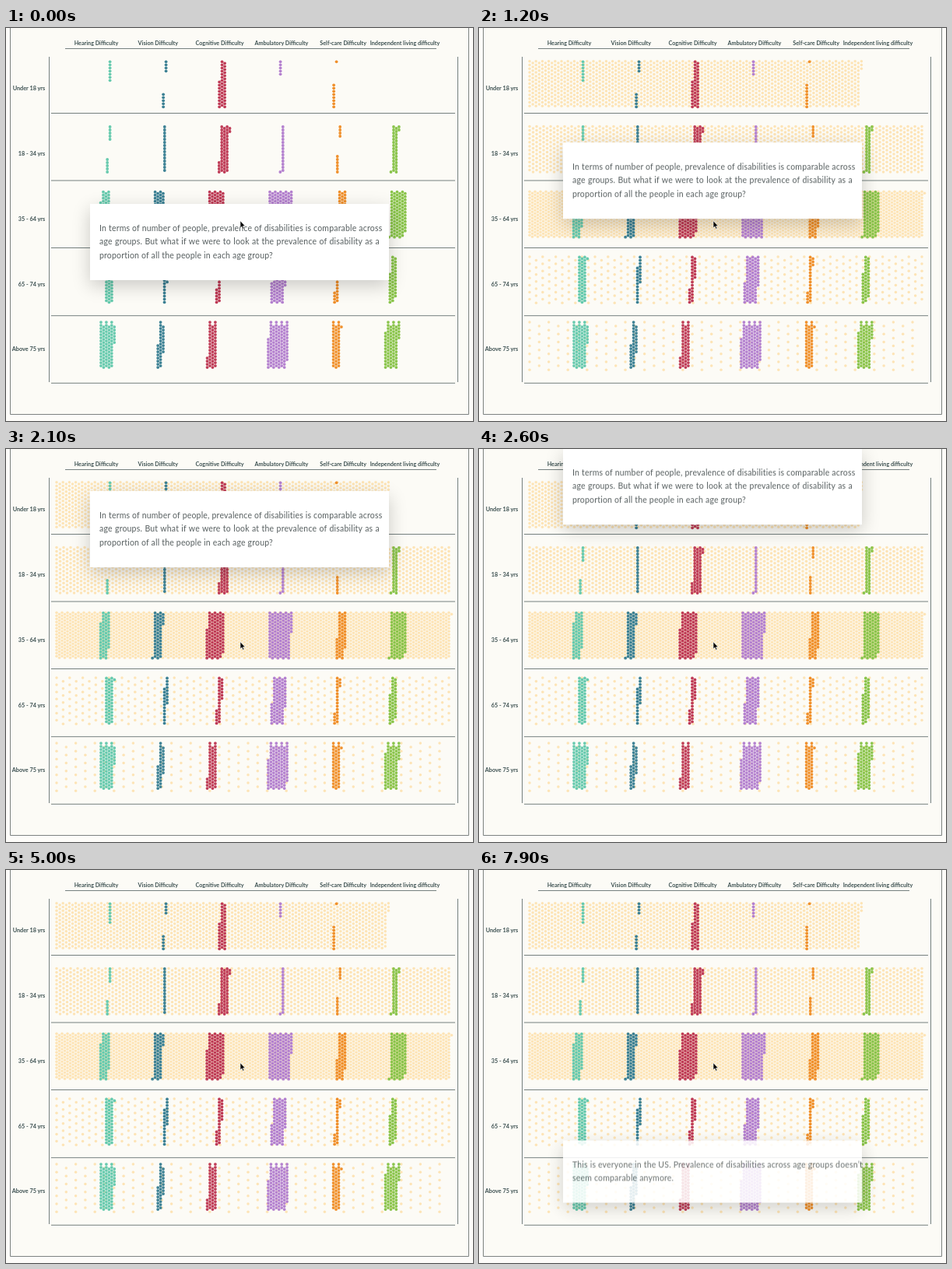
Animation of 600x505 px, one loop 8 s. Source, as an HTML page with a canvas:

```html
<!DOCTYPE html>
<html lang="en">
<head>
<meta charset="utf-8">
<title>Disability by age group</title>
<style>
  html, body { margin: 0; width: 100%; height: 100%; overflow: hidden; background: #fdfcf9; }
  #stage { position: relative; width: 600px; height: 505px; overflow: hidden; font-family: Lato, "Open Sans", sans-serif; }
  #stage > * { position: absolute; left: 0; top: 0; }
  svg text { font-size: 7.2px; font-weight: 700; fill: #3c5051; }
  svg .row { font-size: 7.3px; text-anchor: end; }
  svg .head { text-anchor: middle; }

  #everyone { animation: reveal 8s linear infinite; }
  .card {
    box-sizing: border-box; width: 384px; padding: 22.5px 12px;
    background: #fff; box-shadow: 0 7px 22px rgba(0, 0, 0, .2);
    color: #565e5f; font-size: 10.5px; line-height: 17.5px; letter-spacing: .19px;
  }
  .card span { display: block; white-space: nowrap; text-align: justify; text-align-last: justify; }
  .card span:last-child { text-align-last: left; }
  #question { animation: leave 8s linear infinite; }
  #answer { animation: enter 8s linear infinite; }

  @keyframes reveal {
    0%, 1% { opacity: 0; }
    7.5%, 100% { opacity: 1; }
  }
  @keyframes leave {
    0% { transform: translate(108px, 226px); animation-timing-function: cubic-bezier(.333, 0, .667, .333); }
    8.75% { transform: translate(108px, 196.5px); }
    21.25% { transform: translate(108px, 98px); }
    32.5% { transform: translate(108px, -.7px); }
    45.5%, 100% { transform: translate(108px, -140px); }
  }
  @keyframes enter {
    0%, 90.5% { transform: translate(108px, 386px); opacity: 0; }
    98.75%, 100% { transform: translate(108px, 347.5px); opacity: .87; }
  }
</style>
</head>
<body>
<div id="stage">
  <svg id="frame" width="600" height="505">
    <path d="M5.5 -2V496.5H594.5V-2" fill="#fcfbf6" stroke="#7d8281"/>
    <g id="axes" fill="none" stroke="#75807f"></g>
    <g id="labels"></g>
  </svg>
  <canvas id="everyone" width="600" height="505"></canvas>
  <canvas id="disabled" width="600" height="505"></canvas>
  <div class="card" id="question">
    <span>In terms of number of people, prevalence of disabilities is comparable across</span>
    <span>age groups. But what if we were to look at the prevalence of disability as a</span>
    <span>proportion of all the people in each age group?</span>
  </div>
  <div class="card" id="answer">
    <span>This is everyone in the US. Prevalence of disabilities across age groups doesn’t</span>
    <span>seem comparable anymore.</span>
  </div>
  <svg width="600" height="505">
    <path d="M301 247.8V256.8L303 255L304.4 258.2L305.9 257.5L304.5 254.5H307.2Z" fill="#000" stroke="#fff" stroke-width=".6"/>
  </svg>
</div>
<script>
const SVG = "http://www.w3.org/2000/svg";
const byId = id => document.getElementById(id);

function addTo(parent, tag, attrs, text = "") {
  const el = document.createElementNS(SVG, tag);
  for (const key in attrs) el.setAttribute(key, attrs[key]);
  el.textContent = text;
  byId(parent).append(el);
}

const kinds = ["Hearing Difficulty", "Vision Difficulty", "Cognitive Difficulty",
  "Ambulatory Difficulty", "Self-care Difficulty", "Independent living difficulty"];
const ages = ["Under 18 yrs", "18 - 34 yrs", "35 - 64 yrs", "65 - 74 yrs", "Above 75 yrs"];
const colors = ["#67caae", "#3c8194", "#bf3c57", "#b481cf", "#f0902c", "#8ac44b"];

const rowGap = 83.7;
kinds.forEach((name, i) => addTo("labels", "text", { class: "head", x: 116 + 79.3 * i, y: 22 }, name));
ages.forEach((name, i) => addTo("labels", "text", { class: "row", x: 50.3, y: 80.4 + rowGap * i }, name));

addTo("axes", "path", { d: "M76 26.5H553M55.5 37V455M580.5 37V455" });
[109.5, 196, 282.5, 369.7, 456.3].forEach(y => addTo("axes", "path", { d: `M58 ${y}H577` }));

function dot(ctx, x, y, r) {
  ctx.beginPath();
  ctx.arc(x, y, r, 0, 2 * Math.PI);
  ctx.fill();
}

// Everyone: staggered lattice per age group, with a short closing column
const fields = [
  { top: 42.7, bottom: 102.5, right: 490, dx: 4.1, dy: 4.8, rest: 3 },
  { top: 126.4, bottom: 187, right: 572, dx: 4.5, dy: 5.1, rest: 0 },
  { top: 210.2, bottom: 269.5, right: 571, dx: 3.5, dy: 4, rest: 1 },
  { top: 294, bottom: 355, right: 573, dx: 8.4, dy: 9.1, rest: 0 },
  { top: 378, bottom: 441, right: 562, dx: 12.3, dy: 10.2, rest: 0 },
];
const crowd = byId("everyone").getContext("2d");
crowd.fillStyle = "#fde4b6";
for (const { top, bottom, right, dx, dy, rest } of fields) {
  const cols = Math.floor((right - 65) / dx) + 1;
  for (let c = 0; c < cols + (rest > 0); c++) {
    const start = top + (c % 2) * dy / 2;
    const end = c < cols ? bottom : start + (rest - .5) * dy;
    for (let y = start; y <= end; y += dy) dot(crowd, 65 + c * dx, y, 1.75);
  }
}

// Per cluster: x of first full column, full columns, dots rising at left, dots hanging at right
const clusters = [
  [[133.6, 0, 0, 7], [205.6, 0, 5, 4], [277.6, 2, 9, 0], [352.6, 0, 0, 5], [424.6, 0, 8, 1]],
  [[133.6, 0, 5, 5], [203.8, 1, 0, 0], [277.2, 3, 4, 2], [355.8, 1, 1, 0], [429.2, 0, 6, 4], [498, 2, 1, 2]],
  [[125, 2, 12, 12], [191.6, 3, 1, 4], [261.6, 5, 10, 13], [339, 8, 0, 7], [428.6, 2, 7, 12], [495.6, 5, 1, 13]],
  [[129, 3, 0, 1], [207, 0, 12, 9], [274, 1, 5, 7], [344.8, 4, 7, 10], [425.6, 1, 4, 3], [496.8, 1, 10, 13]],
  [[122, 5, 0, 6], [198.6, 1, 8, 9], [262, 3, 4, 0], [340.4, 6, 10, 13], [420.6, 3, 0, 1], [491, 4, 12, 6]],
];
const colGap = 3.45, dotGap = 4, full = 15;
const few = byId("disabled").getContext("2d");

clusters.forEach((row, r) => row.forEach(([x, count, left, right], k) => {
  few.fillStyle = colors[k];
  for (let c = -1; c <= count; c++) {
    const odd = Math.abs(c % 2);
    const top = 43.3 + rowGap * r + odd * dotGap / 2;
    let from = r === 4 ? odd : 0, to = full;
    if (c < 0) from = full - left;
    else if (c === count) to = from + right;
    for (let i = from; i < to; i++) dot(few, x + c * colGap, top + i * dotGap, 1.9);
  }
}));
</script>
</body>
</html>
```
